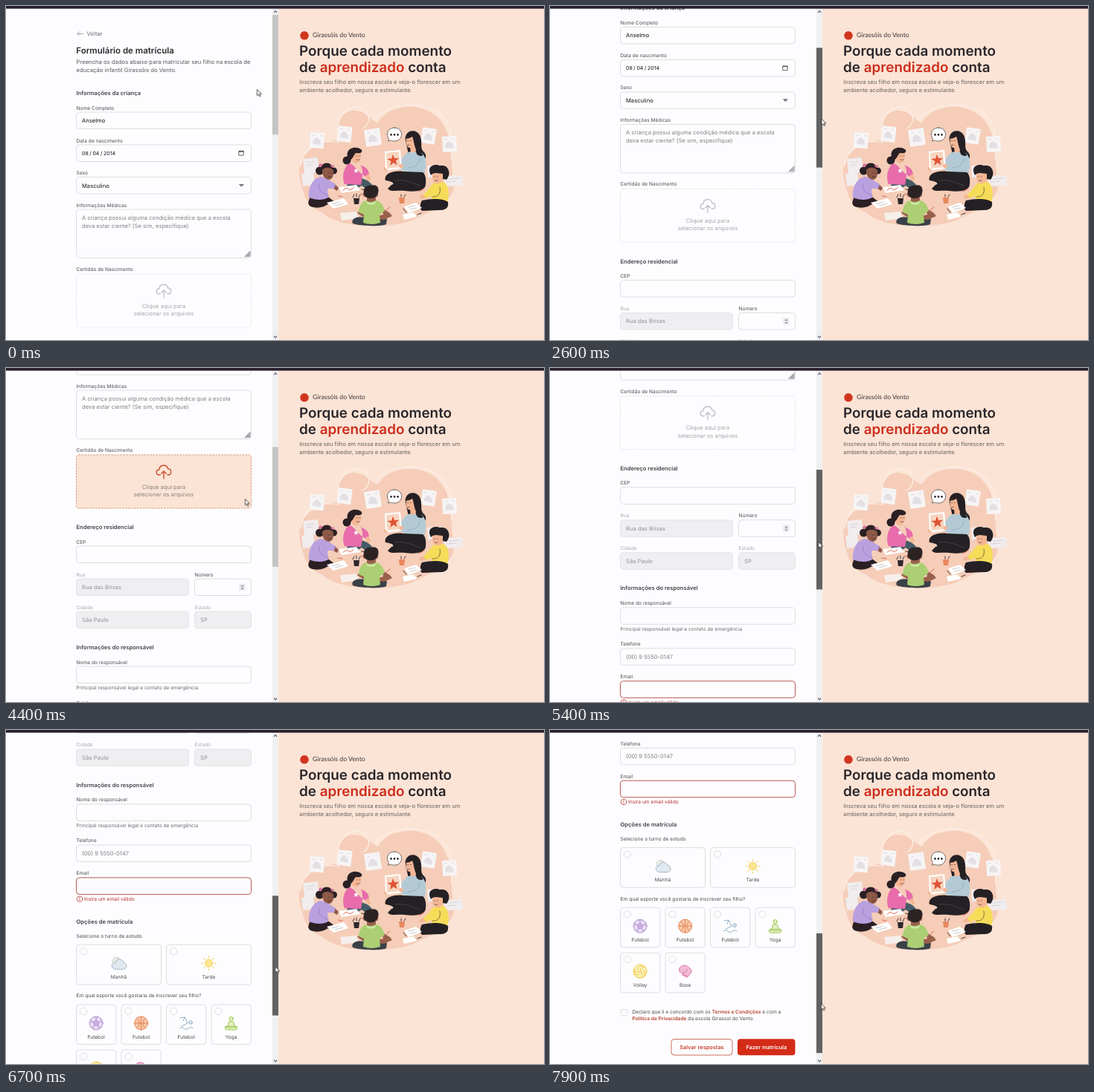
These frames come from a looping animation (723 px wide and 450 px high, 8 s). An HTML page:

```html
<!DOCTYPE html>
<html lang="pt-BR">
<head>
<meta charset="utf-8">
<title>Formulário de matrícula</title>
<style>
@property --scroll { syntax: "<number>"; inherits: true; initial-value: 0; }

html, body { margin: 0; width: 100%; height: 100%; overflow: hidden; background: #fdfcfe; }
svg { display: block; }
#stage {
  width: 723px; height: 450px;
  font-family: Inter, "Open Sans", sans-serif;
  font-size: 7.62px;
  text-rendering: geometricPrecision;
  animation: scroll 8s linear infinite;
}
#page { transform: translateY(calc(var(--scroll) * -1px)); }
#thumb {
  transform: translateY(calc(var(--scroll) * .387px));
  animation: grab 8s step-end infinite;
}
#cursor { animation: point 8s linear infinite; }
#drop { animation: drop 8s step-end infinite; }

@keyframes scroll {
  0%, 23.75% { --scroll: 0; }
  32.5% { --scroll: 114.4; }
  42.5%, 62.5% { --scroll: 244; }
  76.25% { --scroll: 461.3; }
  91.25% { --scroll: 630.5; }
  98.75%, 100% { --scroll: 676.8; }
}
@keyframes point {
  0% { transform: translate(337.4px, 112.4px); }
  16.25% { transform: translate(340.6px, 111px); }
  21.25% { transform: translate(363px, 108px); }
  23.75% { transform: translate(364px, 108px); }
  32.5% { transform: translate(365px, 152px); }
  42.5%, 45% { transform: translate(364px, 202px); }
  53%, 57% { transform: translate(321.5px, 176.5px); }
  61.5%, 62.5% { transform: translate(361px, 203px); }
  76.25% { transform: translate(360px, 288.5px); }
  91.25% { transform: translate(363.5px, 348.5px); }
  98.75%, 100% { transform: translate(364.4px, 368.5px); }
}
@keyframes grab {
  0%, 46.25% { fill: #c4c4c4; }
  21.25%, 43.75%, 60.5% { fill: #a8a8a8; }
  22.5%, 62.5%, 100% { fill: #626262; }
}
@keyframes drop {
  0%, 58.75%, 100% { fill: #fdfcfe; stroke: #e3e2e6; --icon: #c3c2c7; --note: #a6a5aa; }
  50% { fill: #fbe4d5; stroke: #d08f6c; --icon: #cf4f30; --note: #8a807c; }
}

.back { fill: #6a696e; }
.title { font-size: 11.5px; font-weight: 600; fill: #2b2a2e; }
.sub { font-size: 7.68px; fill: #59585d; }
.section { font-weight: 600; fill: #434247; }
.label { font-size: 6.65px; fill: #4c4b50; }
.off.label { fill: #aaa9ae; }
.hint { font-size: 6.65px; fill: #6c6b70; }
.value { fill: #151518; }
.ghost { fill: #818085; }
.off.value { fill: #929196; }
.date { font-size: 7px; word-spacing: -.4px; }
.mid { text-anchor: middle; }
.note { fill: var(--note); stroke: none; }
.box { fill: #fdfcfe; stroke: #d6d5da; stroke-width: .8; }
.off.box { fill: #efeef0; stroke: #dfdee2; }
.bad.box { stroke: #b04843; stroke-width: .9; }
.error { fill: #b3322c; }
.link { font-weight: 600; fill: #b8402f; }
.icon { fill: none; stroke-width: 1; stroke-linecap: round; stroke-linejoin: round; }
.head { font-size: 18.85px; font-weight: 600; fill: #29252a; }
.brand { font-family: Lato, sans-serif; font-size: 8.7px; fill: #3b3438; }
.lead { font-size: 7.55px; fill: #6a605d; }
.button { font-size: 7.35px; font-weight: 600; }
.plain { fill: #c8402d; }
.solid { fill: #fff; }
</style>
</head>
<body>
<svg id="stage" viewBox="0 0 723 450">
  <defs>
    <path id="star" d="M0-10 2.4-3.2 9.5-3.1 3.8 1.2 5.9 8.1 0 4-5.9 8.1-3.8 1.2-9.5-3.1-2.4-3.2Z"/>
    <g id="sheet">
      <rect x="-9.5" y="-10.5" width="19" height="21" fill="#f7f4f5"/>
      <path d="M-6 5C-6-1-2-5 1-3S6 2 5 6Z" fill="#e2e0e4"/>
      <path d="M-6-6.5h3M4-6.5h2" stroke="#dad8dc"/>
    </g>
  </defs>
  <rect width="723" height="450" fill="#fdfcfe"/>
  <g id="page"></g>

  <!-- scrollbar -->
  <rect x="358" width="8.2" height="450" fill="#f0eff2"/>
  <rect id="thumb" x="358" y="12" width="8.2" height="161.3"/>
  <path d="M360 9l2.1-2.4L364.2 9M360 444.6l2.1 2.4 2.1-2.4" fill="none" stroke="#55545a" stroke-width="1.1"/>

  <!-- side panel -->
  <rect x="366.2" width="357" height="450" fill="#fbe4d6"/>
  <circle cx="401" cy="39.8" r="5.8" fill="#d0361f"/>
  <text class="brand" x="412" y="42.4">Girassóis do Vento</text>
  <text class="head" x="394" y="67.2">Porque cada momento</text>
  <text class="head" x="394" y="89.2">de <tspan fill="#cd2c1a">aprendizado</tspan> conta</text>
  <text class="lead" x="394.3" y="104.8">Inscreva seu filho em nossa escola e veja-o florescer em um</text>
  <text class="lead" x="394.3" y="115.6">ambiente acolhedor, seguro e estimulante.</text>

  <g id="scene" stroke-linecap="round" stroke-linejoin="round">
    <path fill="#f5cdb8" d="M398 245C386 210 402 186 447 180C442 154 454 141 468 141C484 142 489 153 500 157C517 126 584 126 595 178C601 203 597 214 602 236C606 262 574 275 554 285C528 300 452 303 424 278C407 272 401 258 398 245Z"/>
    <path fill="none" stroke="#fcefe6" stroke-width="1.2" d="M396 216C399 185 425 180 447 184C440 145 463 130 479 138C491 144 490 160 479 165M497 151C515 130 560 128 582 145C600 160 602 185 598 205"/>
    <g id="wall">
      <use href="#sheet" transform="translate(418 181) rotate(4)"/>
      <use href="#sheet" transform="translate(455 172.5) rotate(7)"/>
      <use href="#sheet" transform="translate(493 177) rotate(-9) scale(1.1)"/>
      <use href="#sheet" transform="translate(568 175) rotate(9)"/>
      <use href="#sheet" transform="translate(596 186) rotate(-3)"/>
      <path fill="#f1eced" d="M399 206l20-2 2 20-20 2zM397 226l16-2 2 17-16 2zM566 215l21-1 1 16-21 1zM588 229l25-1 1 14-25 1z"/>
      <path fill="none" stroke="#d8d5d9" d="M403 211l11-1M404 215l8-1M593 233l16-1M593 237l12-1"/>
    </g>
    <path fill="#fff" stroke="#3c383c" stroke-width=".7" d="M522 164c6 0 9.5 4 9.5 9s-3.5 9-9.5 9c-2 0-3-.3-4.5-1l-4 1 1-3.5c-1.3-1.5-2-3.5-2-5.5 0-5 3.5-9 9.5-9Z"/>
    <path stroke="#1d1a1e" stroke-width="2.6" d="M517.5 173.4h.01M522 173.4h.01M526.5 173.4h.01"/>

    <!-- teacher -->
    <path fill="#242024" d="M537 182C534 167 551 164 556 174C561 185 555 191 562 197C567 203 563 209 556 208L541 200Z"/>
    <path fill="#b3cad6" d="M541 197C534 200 531 207 530 213L520 214V218L534 221L533 227H562C565 218 566 204 559 198C553 195 546 195 541 197Z"/>
    <path fill="#f3b695" d="M538 177C537 185 538 191 543 191L544 197Q549 199 551 195L550 182C548 174 541 173 538 177Z"/>
    <path fill="#242024" d="M537 179C540 171 549 170 552 176C556 186 554 195 561 201C555 204 550 200 551 193C548 187 548 180 546 176Q542 179 537 179Z"/>
    <path fill="none" stroke="#3a2824" stroke-width=".6" d="M539.5 181.5h1.2M543.5 181.5h1M539.5 187.5q1.5.8 2.8-.3"/>
    <path fill="none" stroke="#8faab8" stroke-width=".8" d="M556 206C555 214 550 218 540 218"/>
    <path fill="#242024" d="M534 223C519 221 507 227 510 235C518 236 524 239 518 241L513 246C516 251 526 248 536 249C550 251 564 249 564 240C565 232 563 226 560 224Z"/>
    <path fill="none" stroke="#5b555a" stroke-width=".6" d="M523 235C538 233 546 239 557 242"/>
    <path fill="#fff" d="M509 196l21-2 2 25-22 3z"/>
    <path fill="#f7d5c0" d="M511 198l17-2 2 21-18 2z"/>
    <use href="#star" transform="translate(520.5 208) rotate(-5) scale(.83)" fill="#e05334"/>
    <path fill="#f3b695" d="M528 214q5-3 6 1t-5 3zM510 218q-4-2-2 2t5 1z"/>

    <!-- girl in pink -->
    <path fill="#445b66" d="M460 234C474 229 488 233 494 244L497 248H486L478 242L468 248H457Z"/>
    <circle cx="458" cy="208" r="5.5" fill="#2a2024"/>
    <path fill="#e86bab" d="M462 212C454 215 451 231 455 240L477 241C480 230 480 217 476 214C485 218 487 220 488 227L484 230C473 225 469 214 462 212Z"/>
    <path fill="#f3b695" d="M463 197C463 190 476 190 477 198C478 207 474 212 469 212Q463 210 463 197ZM484 228l4-2 2 8q-3 3-5 0z"/>
    <path fill="#2a2024" d="M461 208C453 194 467 187 477 193C481 197 476 199 470 198C467 201 466 207 461 208Z"/>
    <path fill="none" stroke="#3a2824" stroke-width=".6" d="M471 202h.8M475 202h.8M471 207q2 1.2 4 0"/>
    <use href="#star" transform="translate(470.5 222) scale(.38)" fill="#fff"/>

    <!-- girl in lavender -->
    <g fill="#2a2024">
      <circle cx="421.5" cy="222" r="5.5"/><circle cx="431" cy="219.5" r="8"/><circle cx="440.5" cy="222" r="4.5"/>
      <path d="M410 252C407 264 404 266 409 270C420 274 428 270 433 267L443 272L446 267L434 258Z"/>
    </g>
    <path fill="#8e5948" d="M425 221C428 216 438 217 440 222C441 231 437 235 431 234Q425 231 425 221ZM441 239l6 6-2 4-7-4z"/>
    <path fill="none" stroke="#2a1a18" stroke-width=".6" d="M433 225h.8M437.500 225h.8M433 230q2 1.200 4 0"/>
    <path fill="#d86c9d" d="M420 214l4-2 1 3-4 2zM437 214l4 1-1 3-4-2z"/>
    <path fill="#b9a0df" d="M424 230C412 231 406 245 407 258C416 262 427 262 433 258L432 246L441 246L443 240C435 236 435 234 433 234Z"/>
    <path fill="none" stroke="#977dbf" stroke-width=".8" d="M421 240C418 249 425 252 434 256"/>

    <!-- boy in yellow -->
    <path fill="#f5dd5a" d="M576 238C569 242 568 249 560 254L564 259L572 256L572 264H593C597 251 594 240 588 237Z"/>
    <path fill="#f3b695" d="M573 224C572 235 575 240 581 239Q590 237 589 224ZM560 253l-5 4 3 3 6-2z"/>
    <path fill="#242024" d="M571 228C564 215 577 212 583 215C595 213 599 226 592 234L587 233L587 226C581 226 576 223 571 228ZM559 262C572 259 587 259 594 264C595 271 592 275 583 275L559 276C555 273 557 265 559 262Z"/>
    <path fill="none" stroke="#3a2824" stroke-width=".6" d="M575 230h1M579 230h1M576 235q2 1 4 0M583 244C585 253 580 258 573 257"/>

    <!-- floor sheets -->
    <path fill="#fff" d="M447 244l24-3 5 7-25 4zM431 265l23-6 6 8-20 6zM535 270l16-5 8 7-18 7zM533 281l15-3 4 6-17 4z"/>
    <path fill="#f7efec" d="M449 279l22-2 3 9-23 3z"/>
    <path fill="none" stroke="#d95c45" stroke-width=".9" d="M453 248l5-3 4 3 5-3M477 253l6 3M511 275l5-4M562 246l-7 4M446 256l6 1"/>
    <path fill="none" stroke="#bdb5b8" stroke-width=".8" d="M438 267l10-3M442 269l11-3M541 271l9-2M543 274l9-2"/>
    <path fill="none" stroke="#3a3336" d="M478 247l7 1M534 273l4 5M466 258l2-4M471 257v-4M474 258l2-4M531 257v-3M535 257l2-3M553 281l5-2"/>
    <path fill="#2c262a" d="M467 259h8l-1 8h-6z"/>
    <path fill="#e9875e" d="M528 258h8l-1 8h-6z"/>

    <!-- child in green -->
    <path fill="#3b4148" d="M482 285C470 282 463 288 466 293C478 297 505 297 511 294L512 287Z"/>
    <path fill="#9a604c" d="M480 270L472 279 484 287 487 283 479 278ZM505 272l11 7 3 4-11 5-8-1-1-4 8-2zM485 256h12v11h-12z"/>
    <path fill="#abcf72" d="M483 262C476 265 474 274 474 278L481 281L480 292Q491 296 503 292L502 281L509 276C507 267 501 262 497 262Q490 266 483 262Z"/>
    <path fill="#9a604c" d="M481 251q-2 1-1 4t3 2zM499 251q2 1 1 4t-3 2z"/>
    <path fill="#2b2224" d="M481 254C479 244 486 241 491 242C499 239 503 247 499 254C496 261 484 261 481 254Z"/>
    <path fill="#d6ebb4" d="M484 263q6 5 13 0l-1 3q-5 3-11 0z"/>
  </g>

  <rect width="723" height="3.6" fill="#291f2f"/>
  <path id="cursor" fill="#fff" stroke="#222" stroke-width=".8" d="M0 0V8.3L1.9 6.6 3.2 9.5 4.6 8.9 3.3 6.1H5.9Z"/>
</svg>

<script>
const text = (x, y, s, cls) => `<text x="${x}" y="${y}" class="${cls}">${s}</text>`;
const box = (x, y, w, h, cls = "") =>
  `<rect x="${x}" y="${y}" width="${w}" height="${h}" rx="4" class="box ${cls}"/>`;
const field = (x, y, w, label, value = "", cls = "", state = "") =>
  text(x, y - 3.5, label, `label ${state}`) + box(x, y, w, 22.5, state) +
  text(x + 7.5, y + 14, value, `value ${cls} ${state}`);
const at = (x, y, body, color, extra = "") =>
  `<g transform="translate(${x} ${y})" class="icon" stroke="${color}" ${extra}>${body}</g>`;
const path = (d, extra = "") => `<path d="${d}" ${extra}/>`;
const spin = (n, body) => Array.from({ length: n }, (_, i) =>
  `<g transform="rotate(${i * 360 / n})">${body}</g>`).join("");
const ball = fill => `<circle r="9" fill="${fill}"/>`;

const cloud = "M-5 4H-6C-11 4-11-3-6-3C-6-10 4-11 6-4C11-4 11 4 6 4H5";
const icons = {
  manhã: ["#a3b5c4", '<circle cx="-3" cy="-3" r="5" fill="#f1efe6" stroke="#c3cbd0"/>' +
    path("M-4 8C-11 8-11-1-4-1C-4-7 5-7 6-1C12-1 12 8 6 8Z", 'fill="#e0e9ef"')],
  tarde: ["#f3cd4b", '<circle r="5" fill="#fbe692"/>' + spin(8, path("M0-7.5V-9.3"))],
  futebol: ["#b597d4", ball("#eadff4") + path("M0-4 3.8-1.2 2.4 3.2H-2.4L-3.8-1.2Z", 'fill="#c9b0e2"') +
    spin(5, path("M0-4V-7M-3-8.3 0-6.7 3-8.3"))],
  basquete: ["#e58555", ball("#f8c8aa") + path("M-9 0H9M0-9V9M-6-6.7C-1-3-1 3-6 6.7M6-6.7C1-3 1 3 6 6.7")],
  natação: ["#93aec4", '<circle cx="6" cy="-1" r="2.3" fill="#dce8f0"/>' +
    path("M-8-7-2-8 2 0-6 4M-2-8-4-3M-9 7Q-6 4-3 7T3 7T9 7")],
  yoga: ["#a0c653", '<circle cy="-6" r="2.6" fill="#e4f1c8"/>' +
    path("M-3-2H3L4 3 8 5 3 6H-3L-8 5-4 3ZM-8 6Q0 2 8 6Q9 9 5 9H-5Q-9 9-8 6Z", 'fill="#e4f1c8"')],
  vôlei: ["#efca45", ball("#fcf0bd") + spin(3, path("M0 0C0-4 3-7 7-6M-3.5-1.8C-3-6 0-8 3-8.5"))],
  boxe: ["#dd79aa", path("M-8-2C-8-9 2-10 5-5C10-3 9 3 5 5L3 8-4 5-3 2C-7 2-8 1-8-2Z", 'fill="#f3bcd6"') +
    path("M-3 2C1 2 3 0 2-3M-2 4 4 6.5")]
};
const card = (x, y, w, name, key) =>
  box(x, y, w, 53.7) + `<circle cx="${x + 9.5}" cy="${y + 9}" r="4.7" class="box"/>` +
  at(x + w / 2, y + 25, icons[key][1], icons[key][0]) +
  text(x + w / 2, y + 46, name, "label mid");

const left = 94.5, full = 235, wide = 151, narrow = 76, right = 253.5;

const sports = [
  ["Futebol", "futebol"], ["Futebol", "basquete"], ["Futebol", "natação"],
  ["Yoga", "yoga"], ["Volley", "vôlei"], ["Boxe", "boxe"]
];

document.getElementById("page").innerHTML = [
  at(96, 37.4, path("M0 0H7.5M2.7-2.7 0 0 2.7 2.7"), "#8b8a8f", 'style="stroke-width:.8"'),
  text(108.5, 40, "Voltar", "back"),
  text(94.3, 63.5, "Formulário de matrícula", "title"),
  text(left, 78.1, "Preencha os dados abaixo para matricular seu filho na escola de", "sub"),
  text(left, 88.9, "educação infantil Girassóis do Vento.", "sub"),

  text(left, 120, "Informações da criança", "section"),
  field(left, 143, full, "Nome Completo", "Anselmo"),
  field(left, 187, full, "Data de nascimento", "08 / 04 / 2014", "date"),
  at(316.2, 198.2, path("M-3-2.6H3V3H-3ZM-3-1.8H3M-1.8-3.5V-3M1.8-3.5V-3"), "#444", 'style="stroke-width:.8"'),
  field(left, 230.5, full, "Sexo", "Masculino"),
  path("M312.8 239.9H320L316.4 243.8Z", 'fill="#77767b"'),
  text(left, 270.5, "Informações Médicas", "label"),
  box(left, 274, full, 65.5),
  text(102, 287.9, "A criança possui alguma condição médica que a escola", "ghost"),
  text(102, 298.6, "deva estar ciente? (Se sim, especifique)", "ghost"),
  path("M321 338 328.5 330.5M323.5 338 328.5 333M326 338 328.5 335.5", 'stroke="#8b8a8f" stroke-width="1.2"'),

  text(left, 357, "Certidão de Nascimento", "label"),
  '<g id="drop">',
  `<rect x="${left}" y="361" width="${full}" height="72" rx="3" stroke-width=".9" stroke-dasharray="2.5 1.5"/>`,
  at(212, 384, path(cloud) + path("M0 9V-1M-3.3 2.2 0-1 3.3 2.2"), "", 'style="stroke:var(--icon);stroke-width:1.4"'),
  text(212, 406.5, "Clique aqui para", "note mid"),
  text(212, 416.8, "selecionar os arquivos", "note mid"),
  "</g>",

  text(left, 461.2, "Endereço residencial", "section"),
  field(left, 484, full, "CEP"),
  field(left, 528, wide, "Rua", "Rua das Brisas", "", "off"),
  field(right, 528, narrow, "Número"),
  '<rect x="313.5" y="534.8" width="8" height="9" fill="#e9e8eb"/>',
  path("M315.5 538.6 317.5 536.4 319.5 538.6ZM315.5 540.6 317.5 542.8 319.5 540.6Z", 'fill="#8b8a8f"'),
  field(left, 572, wide, "Cidade", "São Paulo", "", "off"),
  field(right, 572, narrow, "Estado", "SP", "", "off"),

  text(left, 622.7, "Informações do responsável", "section"),
  field(left, 646, full, "Nome do responsável"),
  text(left, 677, "Principal responsável legal e contato de emergência", "hint"),
  field(left, 701, full, "Telefone", "(00) 9 5550-0147", "ghost"),
  field(left, 745, full, "Email", "", "", "bad"),
  at(99, 773.7, '<circle r="3.7"/>' + path("M0-1.8V.3M0 1.8V1.9"), "#b3322c", 'style="stroke-width:.8"'),
  text(105, 776.2, "Insira um email válido", "hint error"),

  text(left, 806.6, "Opções de matrícula", "section"),
  text(left, 826, "Selecione o turno de estudo", "label"),
  card(left, 835.3, 114, "Manhã", "manhã"),
  card(215.5, 835.3, 114, "Tarde", "tarde"),
  text(left, 906.4, "Em qual esporte você gostaria de inscrever seu filho?", "label"),
  ...sports.map(([name, key], i) =>
    card(left + i % 4 * 60.5, 916 + (i >> 2) * 61, 53.3, name, key)),

  '<rect x="95.5" y="1053.3" width="8.4" height="8.4" rx="1.8" class="box"/>',
  text(110.5, 1058.9, 'Declaro que li e concordo com os <tspan class="link">Termos e Condições</tspan> e com a', "label"),
  text(110.5, 1067.9, '<tspan class="link">Política de Privacidade</tspan> da escola Girassol do Vento.', "label"),
  '<rect x="163" y="1093.3" width="82" height="21.5" rx="4" fill="#fdfcfe" stroke="#c9705f"/>',
  '<rect x="252" y="1093" width="77.5" height="22" rx="4" fill="#d32b17"/>',
  text(204, 1106.7, "Salvar respostas", "button mid plain"),
  text(290.8, 1106.7, "Fazer matrícula", "button mid solid")
].join("");
</script>
</body>
</html>
```
